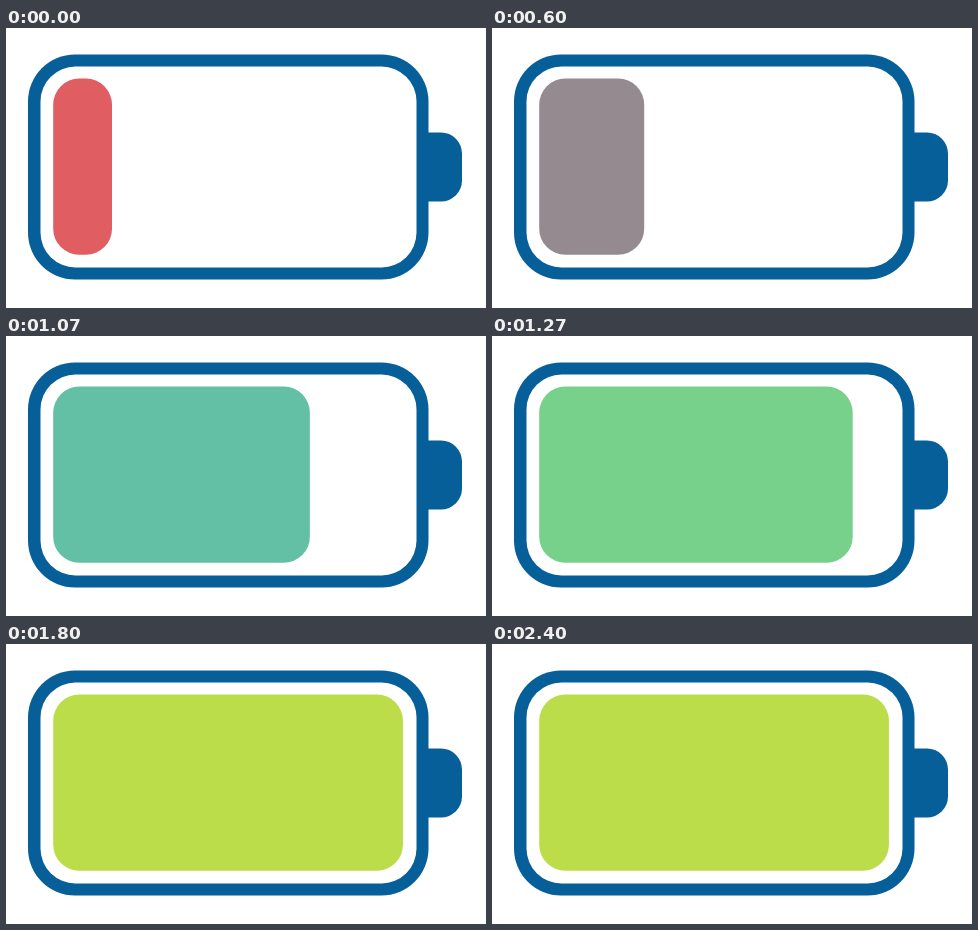
These frames come from a looping animation (480x280 px, 2.87 s). An HTML page with a canvas:

```html
<!DOCTYPE html>
<html lang="en">
<head>
<meta charset="utf-8">
<title>Charging battery</title>
<style>
html, body { margin: 0; width: 100%; height: 100%; overflow: hidden; background: #fff; }
canvas { display: block; }
</style>
</head>
<body>
<canvas id="stage" width="480" height="280"></canvas>
<script>
const ctx = document.getElementById('stage').getContext('2d');
const LOOP = 2870;
const FPS = 15;
const BLUE = '#065f98';
const RISE = { start: 258, length: 1312, from: 106, to: 397.5 };

// Charge colours and the times (ms) they are reached
const tints = [
  { at: 267, rgb: [224, 93, 98] },
  { at: 900, rgb: [82, 178, 186] },
  { at: 1267, rgb: [120, 209, 139] },
  { at: 1533, rgb: [188, 221, 74] }
];

const clamp = u => Math.min(Math.max(u, 0), 1);
const mix = (a, b, u) => a + (b - a) * u;

function edgeAt(t) {
  const u = clamp((t - RISE.start) / RISE.length);
  return mix(RISE.from, RISE.to, (1 - Math.cos(Math.PI * u)) / 2);
}

function tintAt(t) {
  const i = Math.max(1, tints.findIndex(key => key.at >= t));
  const a = tints[i - 1], b = tints[i];
  const u = clamp((t - a.at) / (b.at - a.at));
  return `rgb(${a.rgb.map((c, n) => Math.round(mix(c, b.rgb[n], u))).join(',')})`;
}

function box(left, top, right, bottom, radius, color) {
  ctx.beginPath();
  ctx.roundRect(left, top, right - left, bottom - top, radius);
  ctx.fillStyle = color;
  ctx.fill();
}

function draw(now) {
  // The picture moves in steps and rests once the battery is full.
  const tick = Math.floor((now % LOOP + 4) * FPS / 1000);
  const t = Math.min(tick * 1000 / FPS, 1533);
  ctx.fillStyle = '#fff';
  ctx.fillRect(0, 0, 480, 280);
  box(412, 104.5, 456, 173.5, [0, 21, 21, 0], BLUE);
  box(22, 26.5, 422.5, 251.5, 47, BLUE);
  box(34.5, 38.5, 410.5, 239.5, 35, '#fff');
  box(47.2, 50.6, edgeAt(t), 226.7, 26, tintAt(t));
}

const start = performance.now();
function loop() {
  draw(performance.now() - start);
  requestAnimationFrame(loop);
}
loop();
</script>
</body>
</html>
```
